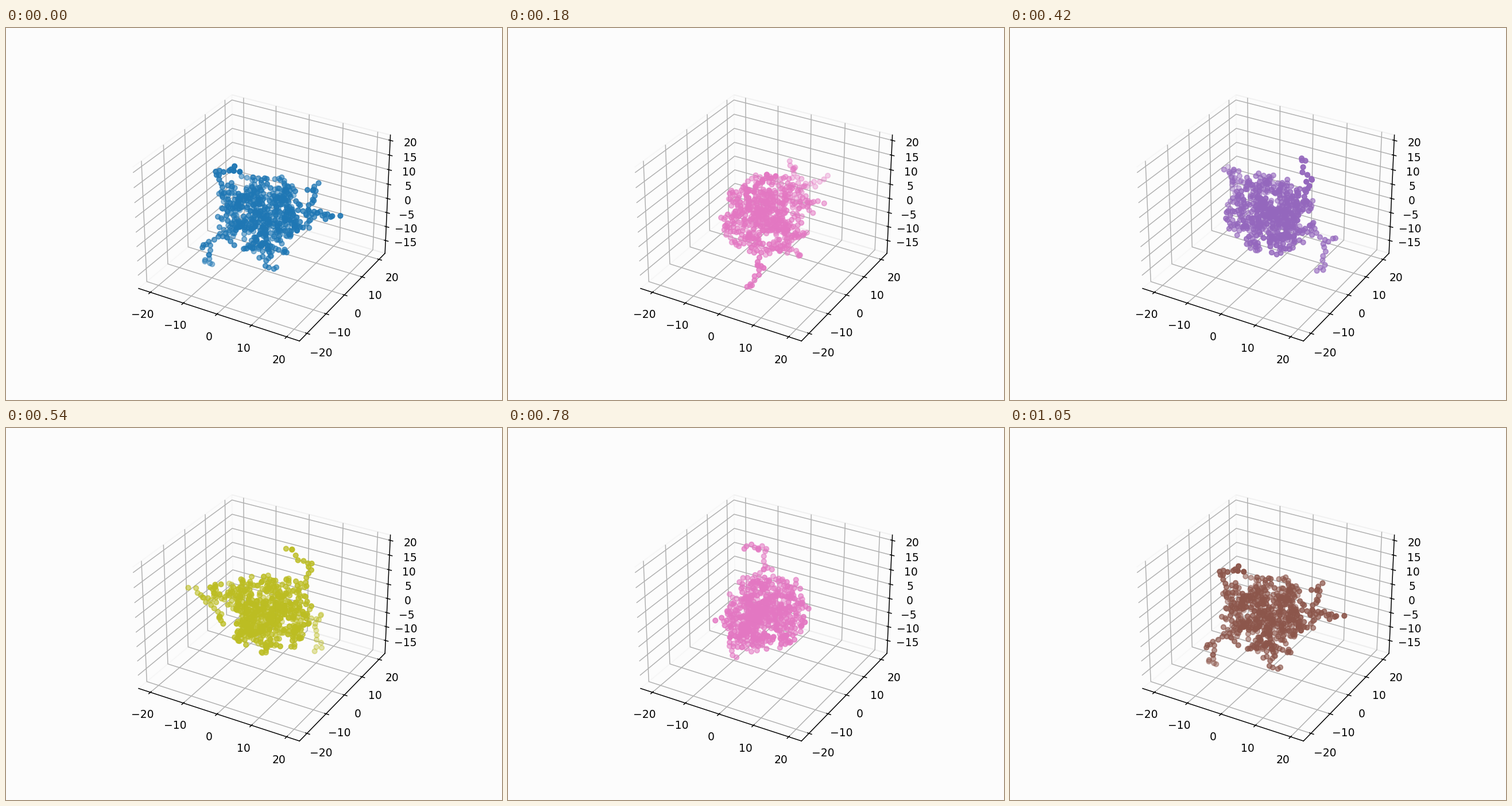
Animation of 864x648 px, one loop 1.08 s. Source, as a matplotlib script:

```python
import numpy as np
import matplotlib.pyplot as plt
from matplotlib.animation import FuncAnimation

FRAMES = 36
STEP = 1.5      # distance between touching particles
COUNT = 580
CORE = 13       # radius of the branched core

# Longest branch tips: radius, azimuth in degrees, height
TIPS = [
    (11.7, -137, 15.3), (8.5, -121, 19.2), (8.5, -106, 18.5),
    (17.5, -124, -6), (13.8, -139, -15.5), (8.2, -38, -13),
    (20.7, 7, 5.2), (13.8, 32, 10.6), (14.9, -27, 3.2),
]


def unit(v):
    return v / np.linalg.norm(v)


def grow_branch(points, tip, rng):
    """Wobble out to the tip from a particle that is near both tip and centre."""
    pos = min(points, key=lambda p: np.linalg.norm(tip - p) + 0.4 * np.linalg.norm(p))
    while np.linalg.norm(tip - pos) > 1.4 * STEP:
        pos = pos + STEP * unit(unit(tip - pos) + rng.normal(0, 0.5, 3))
        points.append(pos)
    points.append(tip)


def grow_core(points, rng):
    """Add particles by stepping from the nearest one towards random goals."""
    while len(points) < COUNT:
        goal = CORE * rng.random() ** 0.45 * unit(rng.normal(size=3))
        gaps = np.linalg.norm(np.array(points) - goal, axis=1)
        near = points[gaps.argmin()]
        if gaps.min() > STEP:
            points.append(near + STEP * unit(unit(goal - near) + rng.normal(0, 0.2, 3)))
        elif gaps.min() > 0.8 * STEP:
            points.append(goal)


def grow_cluster(rng):
    points = [np.zeros(3)]
    for r, azimuth, z in TIPS:
        a = np.radians(azimuth)
        grow_branch(points, np.array([r * np.cos(a), r * np.sin(a), z]), rng)
    grow_core(points, rng)
    return np.array(points).T


x, y, z = grow_cluster(np.random.default_rng(7))

fig = plt.figure(figsize=(6.4, 4.8), dpi=135, facecolor="#fcfcfc")
ax = fig.add_subplot(projection="3d", facecolor="#fcfcfc")
ax.set_xlim(-23.65, 23.6)
ax.set_ylim(-23.8, 23.6)
ax.set_zlim(-19.65, 21.8)
for axis in (ax.xaxis, ax.yaxis, ax.zaxis):
    axis.pane.set_fill(False)


def update(i):
    for old in list(ax.collections):
        old.remove()
    turn = 2 * np.pi * i / (FRAMES - 1)
    c, s = np.cos(turn), np.sin(turn)
    return [ax.scatter(c * x - s * y, s * x + c * y, z, color=f"C{i % 10}")]


anim = FuncAnimation(fig, update, frames=FRAMES, interval=30, repeat=True, repeat_delay=0)
plt.show()
```
